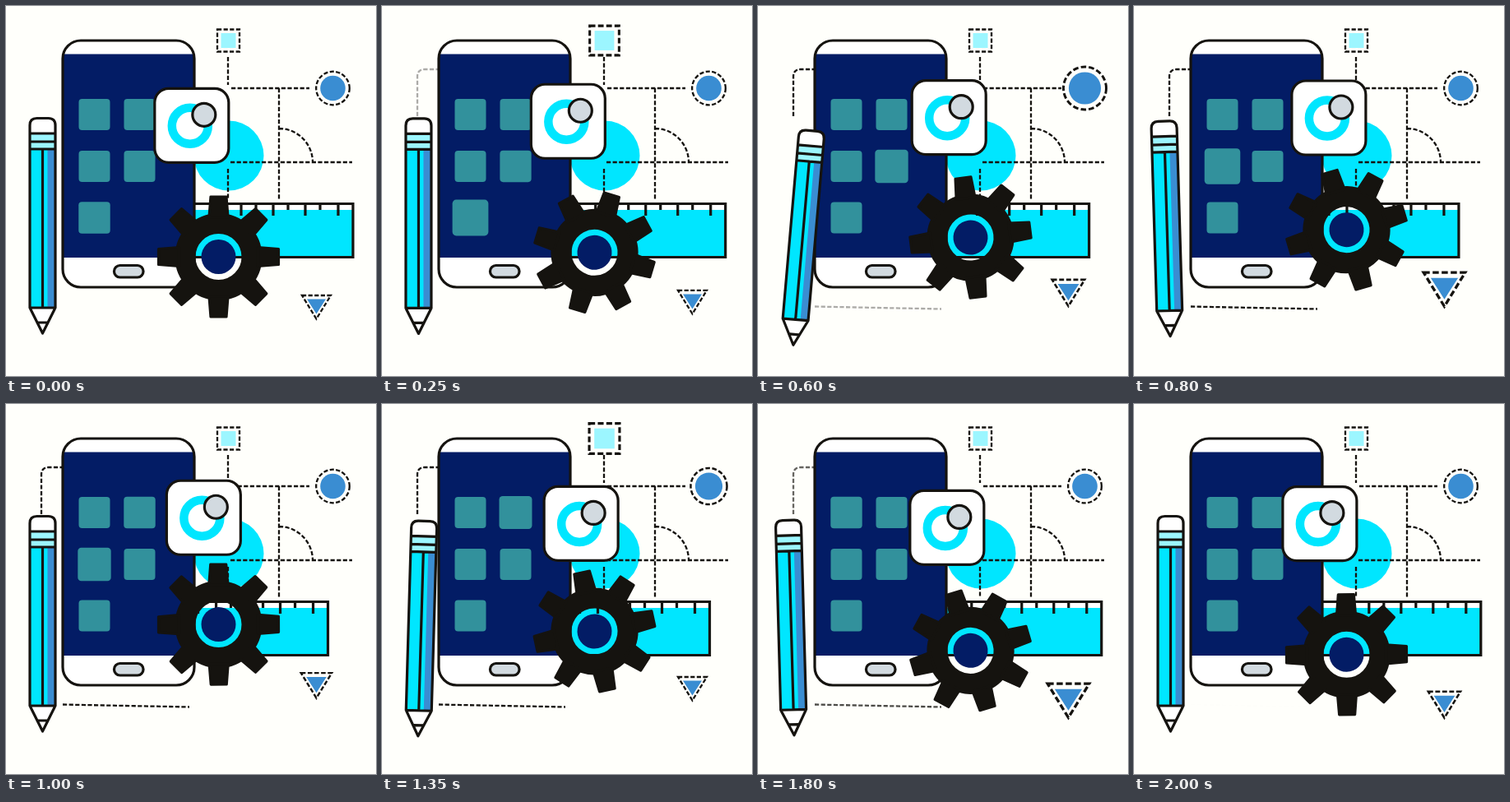
An HTML page that plays this animation: 450 px wide and 450 px high, repeating every 2050 ms.

```html
<!DOCTYPE html>
<html lang="en">
<head>
<meta charset="utf-8">
<title>App design tools</title>
<style>
html, body { margin: 0; width: 100%; height: 100%; overflow: hidden; background: #fffffb; }
svg { display: block; width: 100vw; height: 100vh; }
.ink { stroke: #15130f; stroke-width: 3.2; stroke-linejoin: round; stroke-linecap: round; }
.dash { fill: none; stroke: #15130f; stroke-width: 2.3; stroke-dasharray: 5.2 2.4; }
.white { fill: #fff; }
.cyan { fill: #00e6ff; }
.pale { fill: #9cf6ff; }
.blue { fill: #3a8dd2; }
.navy { fill: #031c65; }
.gray { fill: #d2dae0; }
.teal { fill: #32919c; }
.none { fill: none; }
</style>
</head>
<body>
<svg viewBox="0 0 450 450">
  <circle class="cyan" cx="271" cy="182" r="42.5"/>

  <g id="ruler">
    <path class="white" d="M200 241H422V305.500H200Z"/>
    <path class="cyan" d="M200 248H422V305.500H200Z"/>
    <path class="ink none" style="stroke-linejoin:miter" d="M200 240.500H422V305.500H200Z"/>
    <path id="ticks" class="ink none" style="stroke-linecap:butt"/>
  </g>

  <path class="dash" d="M270 62V96M270 198V236M274 100H369M273 190H421M332 100V235M332 149A41 41 0 0 1 373 190"/>
  <path id="sideLine" class="dash" d="M43 134V86Q43 77 52 77H70"/>
  <path id="baseLine" class="dash" d="M69 365.500L223 368.500"/>

  <g id="square">
    <rect class="pale" x="-9" y="-9" width="18" height="18"/>
    <rect class="dash" x="-13.500" y="-13.500" width="27" height="27"/>
  </g>
  <g id="disc">
    <circle class="blue" r="15.300"/>
    <circle class="dash" r="20.300"/>
  </g>
  <g id="triangle">
    <path class="blue" d="M-11.500 -8.500H11.500L0 9.500Z"/>
    <path class="dash" d="M-17.500 -13H17.500L0 15.500Z"/>
  </g>

  <rect class="white" x="69" y="42" width="160" height="300" rx="22"/>
  <path class="navy" d="M69 58.500H229V306H69Z"/>
  <rect class="ink none" x="69" y="42" width="160" height="300" rx="22"/>
  <rect class="ink gray" x="131.500" y="315.500" width="35.500" height="14.500" rx="7"/>
  <g id="tiles"></g>

  <g id="icon">
    <rect class="ink white" x="-45" y="-45" width="90" height="90" rx="17"/>
    <circle class="none" cx="-2" cy=".5" r="22" stroke="#00e6ff" stroke-width="10.500"/>
    <circle class="ink gray" cx="15" cy="-13" r="14"/>
  </g>

  <g id="gear">
    <circle class="none" r="40.500" stroke="#15130f" stroke-width="25"/>
    <circle class="navy" r="21"/>
  </g>

  <g id="pencil">
    <path class="white" d="M-15.500 -243V-253Q-15.500 -261.500 -7 -261.500H7Q15.500 -261.500 15.500 -253V-243Z"/>
    <path class="pale" d="M-15.500 -243H15.500V-224H-15.500Z"/>
    <path class="cyan" d="M-15.500 -224H15.500V-31H-15.500Z"/>
    <path class="blue" d="M6 -224H15.500V-31H6Z"/>
    <path class="white" d="M-15.500 -31H15.500L0 0Z"/>
    <path class="ink none" d="M-15.500 -31V-253Q-15.500 -261.500 -7 -261.500H7Q15.500 -261.500 15.500 -253V-31L0 0L-15.500 -31H15.500M-15.500 -243H15.500M-15.500 -233H15.500M-15.500 -224H15.500M0 -224V-31M-5.500 -13H5.500"/>
  </g>
</svg>
<script>
const LOOP = 2050, HALF = LOOP / 2;
const $ = id => document.getElementById(id);
const ease = p => (1 - Math.cos(Math.PI * p)) / 2;
const linear = p => p;

// Interpolates a list of [time, value] keys.
function track(t, keys, curve = ease) {
  const i = keys.findIndex(k => k[0] > t);
  if (i < 0) return keys[keys.length - 1][1];
  if (i === 0) return keys[0][1];
  const [t0, a] = keys[i - 1], [t1, b] = keys[i];
  return a + (b - a) * curve((t - t0) / (t1 - t0));
}

// Smooth bump from 0 to 1 and back around a peak time.
function pulse(t, peak, reach) {
  const d = Math.abs(t - peak) / reach;
  return d < 1 ? Math.cos(d * Math.PI / 2) ** 2 : 0;
}

function place(el, x, y, angle = 0, scale = 1) {
  el.setAttribute("transform", `translate(${x} ${y}) rotate(${angle}) scale(${scale})`);
}

function add(parent, tag, attrs) {
  const el = document.createElementNS("http://www.w3.org/2000/svg", tag);
  for (const name in attrs) el.setAttribute(name, attrs[name]);
  return parent.appendChild(el);
}

$("ticks").setAttribute("d", [264, 286, 304, 325, 343, 364, 382, 404]
  .map((x, i) => `M${x} 241V${i === 0 || i % 2 ? 255 : 248}`).join(""));

for (let i = 0; i < 8; i++) {
  add($("gear"), "path", {
    d: "M-9.500 -73H9.500L11.500 -48H-11.500Z", class: "ink",
    fill: "#15130f", transform: `rotate(${i * 45})`
  });
}

// Tile centre and the time at which it swells.
const tiles = [
  [107.5, 132, 1600], [162.5, 132, 1200], [107.5, 195, 860],
  [162.5, 195, 460], [107.5, 257.5, 200]
].map(([x, y, peak]) => ({
  x, y, peak,
  el: add($("tiles"), "rect", { class: "teal", x: -19, y: -19, width: 38, height: 38, rx: 4 })
}));

const orbit = [[0, -13], [450, 53], [800, 110], [1000, 139], [1350, 194], [1600, 254], [2000, 345], [2050, 347]];
const tilt = [[260, 0], [480, 8], [800, -1.7], [950, 0]];
const dip = [[225, 0], [480, 17], [940, 0]];

function draw(t) {
  const h = t % HALF;
  const sway = ease(t / HALF);
  const spin = sway ** 1.07;
  const turn = t < HALF ? spin : 2 - spin;

  place($("ruler"), -30.5 * sway, 0);
  place($("gear"), 258.5, 305 - 37 * sway, 135 * turn);

  const a = track(t, orbit, linear) * Math.PI / 180;
  place($("icon"), 234 - 8.4 * Math.cos(a), 143.5 - 8 * Math.sin(a));

  const drop = track(h, dip);
  place($("pencil"), 44.5 - drop / 9, 398 + drop, track(h, tilt));

  place($("square"), 270.5, 42, 0, 1 + 0.37 * pulse(h, 310, 254));
  place($("disc"), 397.5, 100, 0, 1 + 0.36 * pulse(h, 515, 280));
  const grow = pulse(t, 785, 290) + pulse(t, 1810, 290);
  place($("triangle"), 377.5, 365 - 24 * sway ** 0.7, 0, 1 + 0.45 * grow);

  for (const { el, x, y, peak } of tiles) place(el, x, y, 0, 1 + 0.17 * pulse(t, peak, 240));

  $("sideLine").style.opacity = track(t, [[150, 0], [400, 1], [1680, 1], [1980, 0]]);
  $("baseLine").style.opacity = track(t, [[500, 0], [750, 1], [1700, 1], [2010, 0]]);
}

const start = performance.now();
function tick() {
  draw((performance.now() - start) % LOOP);
  requestAnimationFrame(tick);
}
tick();
</script>
</body>
</html>
```
